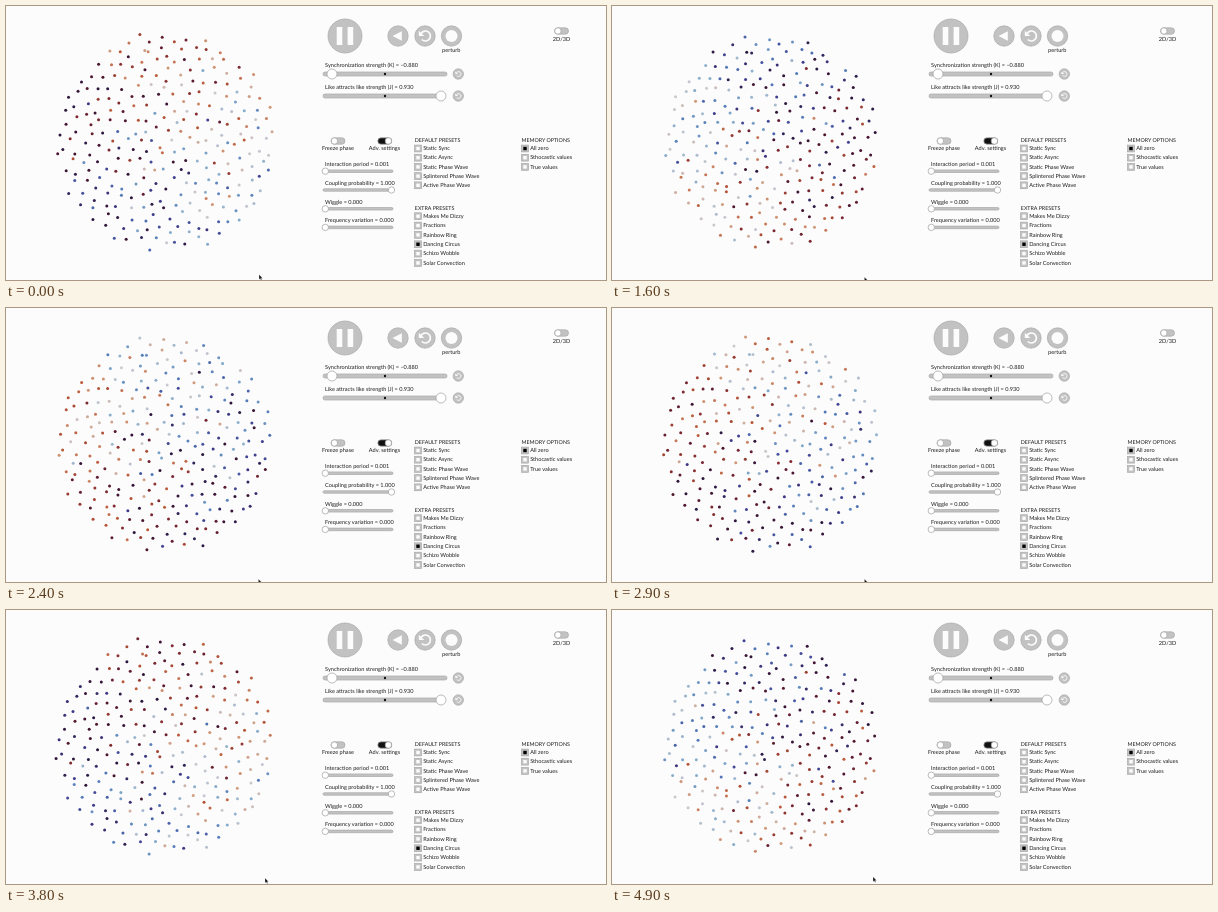
These frames come from a looping animation (600x274 px, 5000 ms). An HTML page:

```html
<!DOCTYPE html>
<html lang="en">
<head>
<meta charset="utf-8">
<title>Swarm simulation</title>
<style>
  html, body { margin: 0; width: 100%; height: 100%; overflow: hidden; background: #fcfcfc; }
  svg { display: block; width: 600px; height: 274px; }
  text { font: 5.6px Lato, "Open Sans", sans-serif; fill: #1c1c1c; text-rendering: geometricPrecision; }
  .head { font-size: 5.35px; }
  .mid { text-anchor: middle; }
  .grey { fill: #c2c2c2; stroke: #a9a9a9; stroke-width: .7; }
  .knob { fill: #fff; stroke: #a0a0a0; stroke-width: .7; }
  .white { fill: #fcfcfc; }
  .turn { fill: none; stroke: #fcfcfc; }
</style>
</head>
<body>
<svg id="stage" viewBox="0 0 600 274" xmlns="http://www.w3.org/2000/svg">
  <rect width="600" height="274" fill="#fcfcfc"/>
  <g id="swarm"></g>
  <g id="panel"></g>
  <path id="cursor" d="M0 0V5L1.2 4L2 5.7L2.9 5.3L2.1 3.7H3.6Z" fill="#111" stroke="#fff" stroke-width=".3"/>
</svg>
<script>
const LOOP = 5000, STEP = 100, TURN = 3500, TAU = Math.PI * 2;
const COUNT = 285, RADIUS = 108.5;
const swarm = document.getElementById('swarm');
const panel = document.getElementById('panel');
const cursor = document.getElementById('cursor');

function add(parent, tag, attrs, label) {
  const node = document.createElementNS('http://www.w3.org/2000/svg', tag);
  for (const key in attrs) node.setAttribute(key, attrs[key]);
  if (label) node.textContent = label;
  parent.appendChild(node);
  return node;
}

const circle = (cx, cy, r, cls) => add(panel, 'circle', { cx, cy, r, class: cls });
const box = (x, y, width, height, attrs) => add(panel, 'rect', { x, y, width, height, ...attrs });
const path = (d, attrs) => add(panel, 'path', { d, ...attrs });
const write = (x, y, label, cls = '') => add(panel, 'text', { x, y, class: cls }, label);

function resetIcon(x, y, r) {
  path(`M${x - r * .85} ${y - r * .5}A${r} ${r} 0 1 1 ${x - r * .7} ${y + r * .7}`,
    { class: 'turn', 'stroke-width': r * .34 });
  path(`M${x - r * 1.3} ${y - r * 1.05}V${y}H${x - r * .2}Z`, { class: 'white' });
}

function slider(x, y, width, knobX, size, label) {
  box(x, y - size * .4, width, size * .8, { rx: size * .4, class: 'grey' });
  circle(knobX, y, size, 'knob');
  write(319, y - (size > 4 ? 7 : 5), label);
}

function toggle(x, y, on) {
  box(x, y - 3.2, 14, 6.4, { rx: 3.2, class: 'grey', ...(on && { style: 'fill:#111' }) });
  circle(on ? x + 10.6 : x + 3.4, y, 3.2, 'knob');
}

function options(x, y, gap, labels, chosen) {
  labels.forEach((label, i) => {
    const cy = y + i * gap, on = label === chosen;
    box(x - 3.4, cy - 3.4, 6.8, 6.8, { class: 'grey' });
    box(x - 1.7, cy - 1.7, 3.4, 3.4, { fill: on ? '#000' : '#fcfcfc' });
    write(x + 5.2, cy + 1.7, label);
  });
}

function buildPanel() {
  circle(339, 30, 17, 'grey');
  box(330.7, 21, 5.6, 18, { class: 'white' });
  box(341.6, 21, 5.6, 18, { class: 'white' });
  for (const x of [392, 419, 445.5]) circle(x, 30, 10.2, 'grey');
  path('M386.5 30L395.8 25.2V34.8Z', { class: 'white' });
  resetIcon(419.3, 30, 5);
  circle(445.5, 30, 6, 'white');
  write(445.3, 46, 'perturb', 'mid');

  slider(317, 68, 124, 326, 5, 'Synchronization strength (K) = −0.880');
  slider(317, 90, 118, 435, 5, 'Like attracts like strength (J) = 0.930');
  for (const y of [68, 90]) {
    add(panel, 'circle', { cx: 379, cy: y, r: 1.2, fill: '#111' });
    circle(452.3, y, 5.2, 'grey');
    resetIcon(452.5, y, 2.4);
  }

  toggle(548.5, 25, false);
  write(555.5, 34.8, '2D/3D', 'mid');
  toggle(325, 135, false);
  write(332, 144.3, 'Freeze phase', 'mid');
  toggle(371.8, 135, true);
  write(378.5, 144.3, 'Adv. settings', 'mid');

  slider(317, 165.2, 70, 319.3, 3.2, 'Interaction period = 0.001');
  slider(317, 184, 70, 385.5, 3.2, 'Coupling probability = 1.000');
  slider(317, 202.8, 70, 319.3, 3.2, 'Wiggle = 0.000');
  slider(317, 221.4, 70, 319.3, 3.2, 'Frequency variation = 0.000');

  write(408.8, 136.3, 'DEFAULT PRESETS', 'head');
  options(412, 142.5, 9.2, ['Static Sync', 'Static Async', 'Static Phase Wave',
    'Splintered Phase Wave', 'Active Phase Wave']);
  write(408.8, 203.8, 'EXTRA PRESETS', 'head');
  options(412, 210.2, 9.35, ['Makes Me Dizzy', 'Fractions', 'Rainbow Ring',
    'Dancing Circus', 'Schizo Wobble', 'Solar Convection'], 'Dancing Circus');
  write(515.5, 136.3, 'MEMORY OPTIONS', 'head');
  options(519, 142.5, 9.2, ['All zero', 'Sthocastic values', 'True values'], 'All zero');
}

let seed = 20417;
function random() {
  seed = (seed * 16807) % 2147483647;
  return seed / 2147483647;
}
const spread = () => random() + random() - 1;

// Cyclic palette: pale, blue, dark, red, orange, pale
const PALETTE = [[203, 201, 208], [134, 172, 203], [82, 121, 184], [62, 60, 140], [43, 22, 60],
  [74, 20, 48], [128, 42, 48], [186, 88, 56], [208, 150, 118]];

function tint(phase) {
  const n = PALETTE.length, at = (phase - Math.floor(phase)) * n;
  const i = Math.floor(at) % n, f = at - Math.floor(at);
  const mix = PALETTE[i].map((c, k) => Math.round(c + (PALETTE[(i + 1) % n][k] - c) * f));
  return `rgb(${mix})`;
}

const dots = Array.from({ length: COUNT }, (_, i) => {
  const r = RADIUS * Math.sqrt((i + .5) / COUNT), angle = i * 2.399963;
  return {
    x: r * Math.cos(angle) + spread() * 3.5,
    y: r * Math.sin(angle) + spread() * 3.5,
    phase: angle / TAU + spread() * (.62 - .36 * r / RADIUS),
    sway: 1 + random(),
    node: add(swarm, 'circle', { r: 1.5 })
  };
});

// Keys are [time, x, y]
const TRACK = [[0, 253, 268.5], [200, 253, 268.5], [400, 252.4, 271], [3100, 252.4, 271],
  [3300, 258, 268.5], [3700, 258, 268.5], [4000, 261, 266.8], [5000, 261, 266.8]];

function cursorAt(t) {
  const i = TRACK.findIndex(key => key[0] > t);
  const a = TRACK[i - 1], b = TRACK[i], f = (t - a[0]) / (b[0] - a[0]);
  return [a[1] + (b[1] - a[1]) * f, a[2] + (b[2] - a[2]) * f];
}

function draw(t) {
  const turn = t / TURN;
  const cx = 160.5 - 1.5 * Math.min(1, t / 2500);
  for (const dot of dots) {
    const phase = dot.phase - turn;
    const a = phase * TAU;
    dot.node.setAttribute('cx', (cx + dot.x + dot.sway * Math.cos(a)).toFixed(2));
    dot.node.setAttribute('cy', (136 + dot.y + dot.sway * Math.sin(a)).toFixed(2));
    dot.node.setAttribute('fill', tint(phase));
  }
  cursor.setAttribute('transform', `translate(${cursorAt(t)})`);
}

buildPanel();
const start = performance.now();
function frame() {
  const t = (performance.now() - start) % LOOP;
  draw(Math.floor(t / STEP) * STEP);
  requestAnimationFrame(frame);
}
frame();
</script>
</body>
</html>
```
